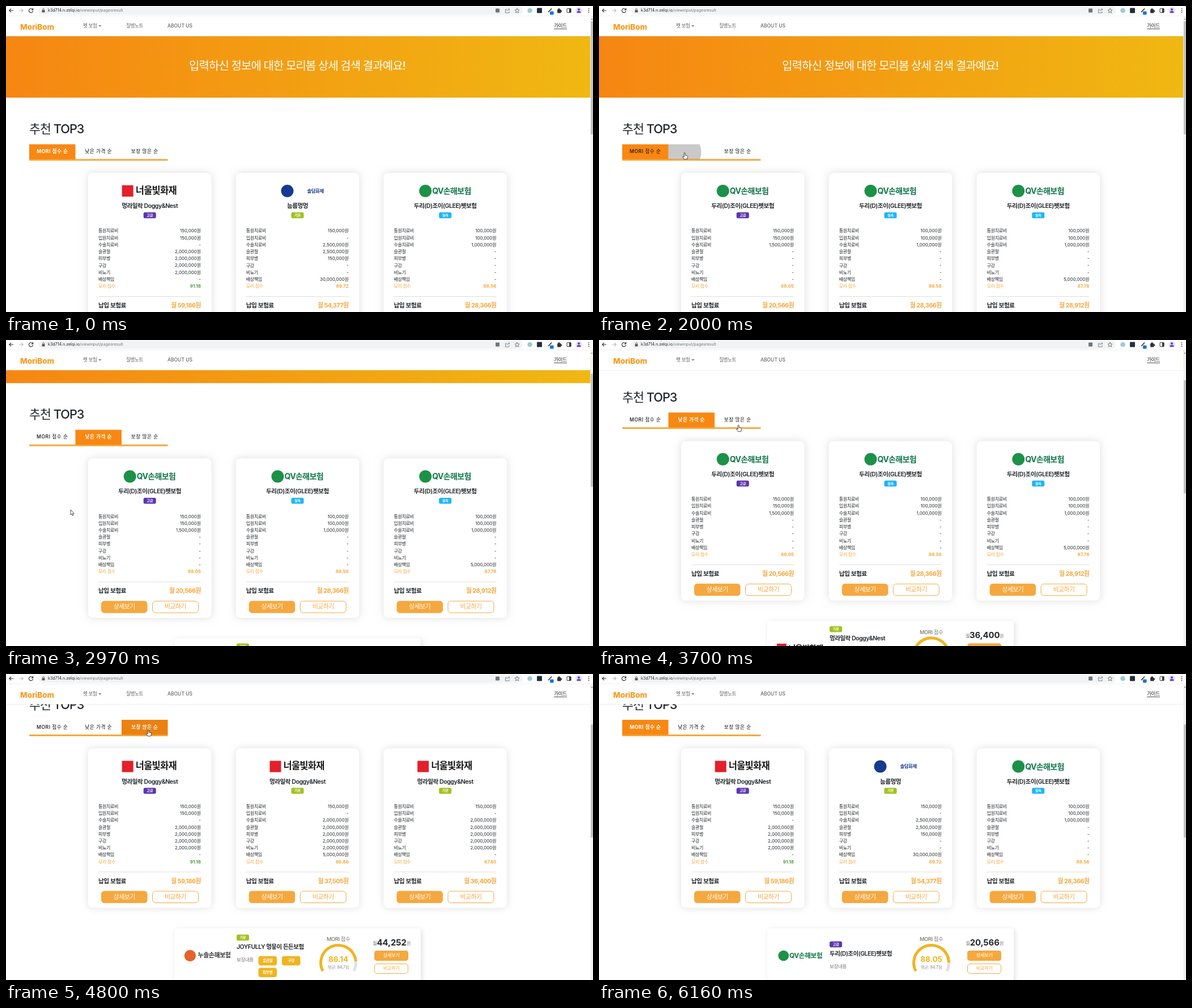
An HTML page with a canvas for the animation above (6.75 s loop, 1036 by 541 pixels).

```html
<!DOCTYPE html>
<html lang="ko">
<head>
<meta charset="utf-8">
<style>
html, body { margin: 0; width: 100%; height: 100%; overflow: hidden; background: #fff; }
canvas { display: block; }
</style>
</head>
<body>
<canvas id="stage" width="1036" height="541"></canvas>
<script>
const ctx = document.getElementById('stage').getContext('2d');
const LOOP = 6750;
const FONT = 'Inter, "Noto Sans CJK KR", "Noto Sans CJK", sans-serif';
const INK = '#212529', AMBER = '#f5a83f', ORANGE = '#f88812', GOLD = '#f0b41f', GREY = '#777';
const GRADES = { 고급: '#5b36b0', 기본: '#a3c01f', 실속: '#1fb6f5' };
const LABELS = ['통원치료비', '입원치료비', '수술치료비', '슬관절', '피부병', '구강', '비뇨기', '배상책임'];
const TABS = ['MORI 점수 순', '낮은 가격 순', '보장 많은 순'];
const TAB_X = 41, TAB_Y = 244.5, TAB_W = 81.5, TAB_H = 26.5;

const LILAC = '멍라일락 Doggy&Nest', GLEE = '두리(D)조이(GLEE)펫보험';
// logo, title, grade, cover amounts in thousands, score, price
const lilacTop = ['M', LILAC, '고급', [150, 150, 0, 2000, 2000, 2000, 2000, 0], '91.18', '59,186'];
const gallant = ['S', '늠름멍멍', '기본', [150, 0, 2500, 2500, 150, 0, 0, 30000], '89.72', '54,377'];
const gleeSave = ['D', GLEE, '실속', [100, 100, 1000, 0, 0, 0, 0, 0], '88.56', '28,366'];
const gleeTop = ['D', GLEE, '고급', [150, 150, 1500, 0, 0, 0, 0, 0], '88.05', '20,566'];
const gleeLiab = ['D', GLEE, '실속', [100, 100, 1000, 0, 0, 0, 0, 5000], '87.78', '28,912'];
const lilacLiab = ['M', LILAC, '기본', [150, 0, 2000, 2000, 2000, 2000, 2000, 5000], '86.86', '37,505'];
const lilacBase = ['M', LILAC, '기본', [150, 0, 2000, 2000, 2000, 2000, 2000, 0], '87.65', '36,400'];
const joyful = ['H', 'JOYFULLY 멍뭉이 든든보험', '기본', [], '86.14', '44,252'];

const VIEWS = [
  { cards: [lilacTop, gallant, gleeSave], next: gleeTop, chips: [], dy: 12 },
  { cards: [gleeTop, gleeSave, gleeLiab], next: lilacBase, chips: ['슬관절', '구강', '피부병', '비뇨기'], dy: -2 },
  { cards: [lilacTop, lilacLiab, lilacBase], next: joyful, chips: ['슬관절', '구강', '피부병'], dy: 0 }
];
const CLICKS = [
  { at: 1890, tab: 1, from: 0, x: 146 },
  { at: 4360, tab: 2, from: 1, x: 247 },
  { at: 5610, tab: 0, from: 2, x: 100 }
];
const PATH = [
  [530, 955, 518], [1190, 57, 257], [1230, 57, 257], [1450, 50, 262], [1880, 151, 259], [2610, 151, 259],
  [2970, 114, 300], [3310, 114, 300], [3660, 246, 150], [3700, 246, 150], [3830, 247, 134], [3980, 247, 108],
  [4130, 247, 98], [4360, 247, 98], [4700, 251, 98], [5060, 251, 98], [5560, 100, 97], [5760, 100, 97],
  [6160, 1030, 541]
];

const ease = (t, a, b) => {
  const p = Math.min(1, Math.max(0, (t - a) / (b - a)));
  return p * p * (3 - 2 * p);
};
const scrollAt = t => 54.5 * [2690, 2872, 3660].reduce((sum, a) => sum + ease(t, a, a + 180), 0);

function text(s, x, y, size, color = INK, weight = 500, align = 'left', spacing) {
  ctx.font = `${weight} ${size}px ${FONT}`;
  ctx.letterSpacing = (spacing ?? (/[가-힣]{2}|월/.test(s) ? -0.045 * size : 0)) + 'px';
  ctx.textAlign = align;
  ctx.textBaseline = 'middle';
  ctx.fillStyle = color;
  ctx.fillText(s, x, y);
}
function box(x, y, w, h, r, fill, stroke) {
  ctx.beginPath();
  ctx.roundRect(x, y, w, h, r);
  if (fill) { ctx.fillStyle = fill; ctx.fill(); }
  if (stroke) { ctx.strokeStyle = stroke; ctx.lineWidth = 1; ctx.stroke(); }
}
function disc(x, y, r, color) {
  ctx.fillStyle = color;
  ctx.beginPath();
  ctx.arc(x, y, r, 0, 7);
  ctx.fill();
}
function line(d, color, width = 1.2, fill) {
  const p = new Path2D(d);
  if (fill) { ctx.fillStyle = fill; ctx.fill(p); }
  ctx.strokeStyle = color;
  ctx.lineWidth = width;
  ctx.stroke(p);
}
function panel(x, y, w, h, r, blur, shift) {
  ctx.save();
  ctx.shadowColor = 'rgba(0,0,0,.13)';
  ctx.shadowBlur = blur;
  ctx.shadowOffsetX = ctx.shadowOffsetY = shift;
  box(x, y, w, h, r, '#fff');
  ctx.restore();
}
function button(s, x, y, w, h, size, solid) {
  if (solid) box(x, y, w, h, h / 4, AMBER);
  else box(x + .5, y + .5, w - 1, h - 1, h / 4, '#fff', AMBER);
  text(s, x + w / 2, y + h / 2, size, solid ? '#fff' : AMBER, 500, 'center');
}
function badge(grade, x, y) {
  box(x - 11, y - 5.3, 22, 10.6, 2.5, GRADES[grade]);
  text(grade, x, y, 6.2, '#fff', 600, 'center');
}

const LOGOS = {
  M() { box(-49, -10, 20, 20, 0, '#e3202b'); text('너울빛화재', -25, 0, 16.5, '#1a1a1a', 700); },
  S() { disc(-18, 0, 11, '#17398f'); text('솔담화재', 17, 0, 8.4, '#17398f', 700); },
  D() { disc(-35, 0, 11, '#1c9148'); text('QV손해보험', -23, 1, 14, '#10774a', 700); },
  H() { disc(-36, 0, 12, '#e4632c'); text('누솔손해보험', -20, 0, 13, '#333', 600); }
};
function logo(name, x, y, scale) {
  ctx.save();
  ctx.translate(x, y);
  ctx.scale(scale, scale);
  LOGOS[name]();
  ctx.restore();
}

function card(x, [brand, title, grade, covers, score, price]) {
  const mid = x + 108.7, left = x + 18, right = x + 199;
  panel(x, 295, 217.5, 282, 8, 14, 0);
  logo(brand, mid, 327, 1);
  text(title, mid, 354, 10.6, INK, 600, 'center');
  badge(grade, mid, 370);
  covers.forEach((v, i) => {
    const y = 398 + i * 12.22;
    text(LABELS[i], left, y, 8);
    text(v ? (v * 1000).toLocaleString('en-US') + '원' : '-', right, y, 7.9, INK, 400, 'right');
  });
  text('모리 점수', left, 495.8, 8, AMBER);
  text(score, right, 495.8, 8, score > 90 ? '#4f9a3f' : AMBER, 700, 'right');
  box(left, 513, 181, 1, 0, '#dedede');
  text('납입 보험료', left, 530, 10.7, INK, 600);
  text(`월 ${price}원`, right, 530, 10.8, AMBER, 700, 'right');
  button('상세보기', x + 23, 547, 81.5, 21.5, 10.9, true);
  button('비교하기', x + 113, 547, 82, 21.5, 10.9);
}

function arc(a, b, color) {
  ctx.beginPath();
  ctx.arc(586.5, 674, 31, a * Math.PI / 180, b * Math.PI / 180);
  ctx.strokeStyle = color;
  ctx.lineWidth = 5;
  ctx.stroke();
}
function listItem({ next: [brand, title, grade, , score, price], chips, dy }) {
  panel(297, 613, 435, 120, 4, 8, 2);
  logo(brand, 355.5, 661.5, .85);
  badge(grade, 418, 629.5 + dy);
  text(title, 407, 646 + dy, 10.5, INK, 600);
  text('보장내용', 407, 669.3 + dy, 8.5, GREY);
  chips.forEach((name, i) => {
    const x = 445.5 + i % 2 * 41.5, y = 662.3 + (i >> 1) * 20.7 + dy;
    box(x, y, 32.5, 16.5, 4, GOLD);
    text(name, x + 16.2, y + 8.3, 6.6, '#fff', 600, 'center');
  });
  const end = 152 + 236 * score / 100;
  arc(152, end, GOLD);
  arc(end, 388, '#e2e2e2');
  text('MORI 점수', 586.5, 633, 9.4, GREY, 500, 'center');
  text(score, 586.5, 668.3, 13.4, GOLD, 700, 'center');
  text('평균: 84.7점', 586.5, 682.6, 7.4, '#999', 500, 'center');
  text('월', 654.5, 640, 8.4, GREY, 500, 'right');
  text(price, 680.7, 639, 14.8, INK, 700, 'center');
  text('원', 707, 640, 8, GREY);
  button('상세보기', 650, 652.5, 60, 18, 8.2, true);
  button('비교하기', 650, 675.5, 60, 18, 8.2);
}

function tabs(t, click, active) {
  const slide = click ? click.from + (click.tab - click.from) * ease(t, click.at + 110, click.at + 410) : 0;
  box(TAB_X, 270.5, TAB_W * 3, 3, 0, AMBER);
  box(TAB_X + slide * TAB_W, TAB_Y, TAB_W, TAB_H, 0, ORANGE);
  TABS.forEach((s, i) => text(s, TAB_X + (i + .5) * TAB_W, 257.5, 8.64,
    i === active ? '#fff' : '#111', i === active ? 700 : 500, 'center', .5));
  if (!click) return;
  const age = t - click.at;
  ctx.save();
  ctx.beginPath();
  ctx.rect(TAB_X + click.tab * TAB_W, TAB_Y, TAB_W, TAB_H);
  ctx.clip();
  disc(click.x, 258, age * .31, `rgba(0,0,0,${.21 * (1 - Math.min(1, Math.max(0, (age - 250) / 250)))})`);
  ctx.restore();
}

function page(t, scroll) {
  const click = CLICKS.filter(c => t >= c.at).pop();
  const active = click ? (t >= click.at + 80 ? click.tab : click.from) : 0;
  const view = VIEWS[active];
  ctx.save();
  ctx.translate(0, -scroll);
  const hero = ctx.createLinearGradient(0, 0, 1031, 0);
  hero.addColorStop(0, '#f68612');
  hero.addColorStop(1, '#f0b812');
  box(0, 53, 1031.5, 109, 0, hero);
  text('입력하신 정보에 대한 모리봄 상세 검색 결과예요!', 514, 107, 20, '#fff', 500, 'center');
  text('추천 TOP3', 41, 218.5, 21.7, INK, 500);
  tabs(t, click, active);
  view.cards.forEach((plan, i) => card(145 + i * 260.75, plan));
  listItem(view);
  ctx.restore();
}

function chrome(scroll) {
  // site navigation
  box(0, 18, 1031.5, 35, 0, '#fff');
  box(0, 53, 1031.5, .6, 0, '#ddd');
  text('MoriBom', 25, 38, 13.4, '#f89a1c', 800);
  text('펫 보험', 136, 35.5, 8.6, '#666');
  line('M163.5 34.3H168L165.75 36.6Z', '#666', .3, '#666');
  text('질병노트', 212, 35.5, 8.6, '#666');
  text('ABOUT US', 285, 35.5, 8.5, '#666');
  text('가이드', 967, 35.5, 8.7, '#222');
  box(967, 40, 23, .8, 0, '#222');
  // scrollbar
  box(1031.5, 18, 4.5, 523, 0, '#f1f1f1');
  box(1032, 27 + scroll * .38, 4, 200, 0, '#c1c1c1');
  line('M1032.7 24L1034 22.3L1035.3 24Z', '#777', .3, '#777');
  // address bar
  box(0, 0, 1036, 18, 0, '#fff');
  box(0, 17.5, 1036, .5, 0, '#e4e4e4');
  box(57, 1, 855, 14.5, 7, '#f1f3f4');
  line('M13 8H6M9 4.8L5.8 8L9 11.2', '#333');
  line('M23 8H30M27 4.8L30.2 8L27 11.2', '#bbb');
  line('M47 6A3.6 3.6 0 1 0 47.6 8.8M47.6 4V6.8H44.8', '#333');
  box(63.5, 7.3, 5, 4, .6, '#555');
  line('M64.6 7.5V6A1.4 1.4 0 0 1 67.4 6V7.5', '#555', .8);
  text('k3d714.n.zelqi.io', 74, 8.3, 7.1, '#222', 400);
  text('/viewinput/pagesresult', 74 + ctx.measureText('k3d714.n.zelqi.io').width, 8.3, 7.1, GREY, 400);
  box(864, 4.5, 7, 7, 1, '#70757a');
  line('M884 6H881.5V12H888V9.5M883.5 9Q884.5 6 888.5 6M886.8 4L889 6L886.8 8', '#666', .8);
  line('M902 4L903.2 6.8L906 7L903.9 9L904.5 12L902 10.4L899.5 12L900.1 9L898 7L900.8 6.8Z', '#555', .8);
  disc(924.5, 8, 4.3, '#9cc9dc');
  box(937, 3.5, 9, 9, 1, '#20303c');
  line('M957 11L963 4.5', '#333', 1.6);
  box(960, 9.5, 6.5, 6, 1, '#1a73d9');
  box(973, 6, 6.5, 6.5, .8, '#333');
  disc(976, 5.6, 1.5, '#333');
  disc(979.8, 9, 1.5, '#333');
  box(990, 4.6, 7, 7, .6, '#fff', '#333');
  box(994, 4.6, 3.2, 7, 0, '#333');
  disc(1011, 8, 6, '#e6defa');
  disc(1011, 6.2, 2, '#5b3fb5');
  box(1007.6, 9, 6.8, 3, [2, 2, 0, 0], '#5b3fb5');
  [4.8, 8, 11.2].forEach(y => disc(1028.5, y, .9, '#444'));
}

function cursor(t, scroll) {
  if (t < PATH[0][0] || t >= 6160) return;
  const i = PATH.findIndex(p => p[0] > t);
  const [t0, x0, y0] = PATH[i - 1], [t1, x1, y1] = PATH[i];
  const p = ease(t, t0, t1), x = x0 + (x1 - x0) * p, y = y0 + (y1 - y0) * p;
  const top = TAB_Y - scroll;
  const onTab = x > TAB_X && x < TAB_X + 3 * TAB_W && y > top && y < top + TAB_H;
  ctx.save();
  ctx.translate(x, y);
  line(onTab
    ? 'M-.8 .9Q.2-.5 1.2 .9V5L4.6 5.7Q5.8 6.1 5.6 7.5L4.7 11.8H-.6L-3.5 7.8Q-3.3 6.2-1.9 7L-.8 8Z'
    : 'M0 0V9L2 7.2L3.6 10.5L5 9.9L3.5 6.8L6.2 6.6Z', '#222', .8, '#fff');
  ctx.restore();
}

function draw() {
  const t = performance.now() % LOOP, scroll = t < 6750 ? scrollAt(t) : 0;
  ctx.fillStyle = '#fff';
  ctx.fillRect(0, 0, 1036, 541);
  page(t, scroll);
  chrome(scroll);
  cursor(t, scroll);
  requestAnimationFrame(draw);
}
draw();
</script>
</body>
</html>
```
